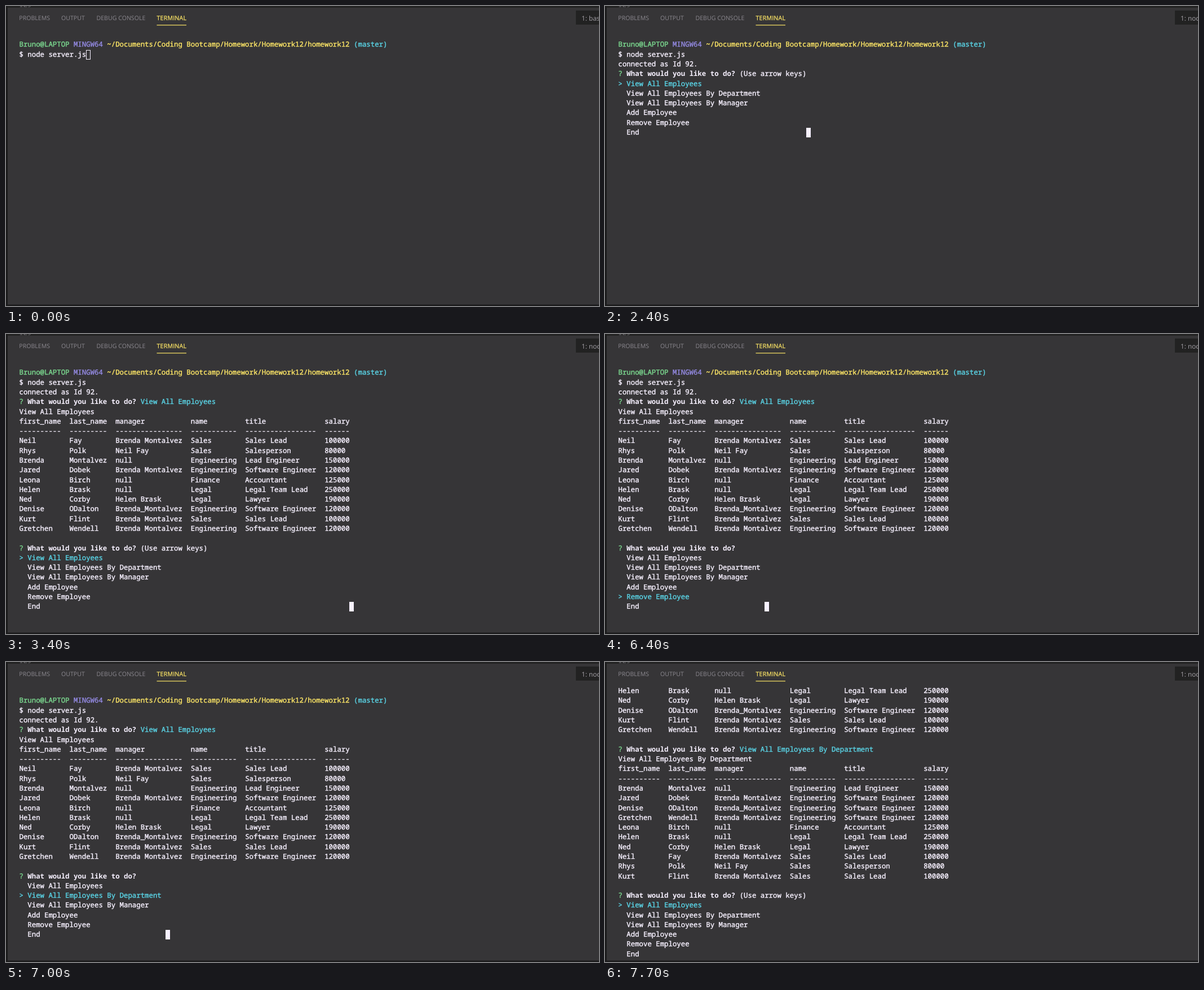
Animation of 1052 by 532 pixels, one loop 8000 ms. Source, as an HTML page:

```html
<!DOCTYPE html>
<html lang="en">
<head>
<meta charset="utf-8">
<title>Employee tracker terminal</title>
<style>
  html, body { margin: 0; width: 100%; height: 100%; overflow: hidden; background: #363537; }
  svg { display: block; width: 1052px; height: 532px; }
  text { white-space: pre; text-rendering: geometricPrecision; }
  #screen, #edge { font-family: "Noto Sans Mono", "DejaVu Sans Mono", monospace; font-size: 12.37px; }
  #screen { stroke-width: .4px; }
  .ui { font-family: "Open Sans", "Noto Sans", sans-serif; font-size: 10.6px; fill: #8b888f; }
  .ui .active { fill: #fce566; stroke: #fce566; stroke-width: .25px; letter-spacing: .2px; }
  #shell { font-size: 11.8px; fill: #a3a0a6; }
</style>
</head>
<body>
<svg viewBox="0 0 1052 532">
  <rect width="1052" height="532" fill="#363537"/>
  <rect width="1052" height="3" fill="#222222"/>
  <rect width="3" height="532" fill="#1b1b1c"/>
  <rect y="529.5" width="1052" height="2.5" fill="#1b1b1c"/>
  <text id="edge" x="23" y="2" fill="#69676c">129</text>
  <g class="ui">
    <text x="23.3" y="24.5">PROBLEMS</text>
    <text x="98" y="24.5">OUTPUT</text>
    <text x="160.5" y="24.5">DEBUG CONSOLE</text>
    <text x="267.5" y="24.5" class="active">TERMINAL</text>
  </g>
  <rect x="267.5" y="33.3" width="52.5" height="1.2" fill="#fce566"/>
  <rect x="1011" y="8" width="41" height="25" fill="#222222"/>
  <text id="shell" class="ui" x="1021" y="25.5">1: bash</text>
  <g id="screen"></g>
  <rect id="caret"/>
  <path id="pointer" d="M-3 -8.5h6M0 -8.5v17M-3 8.5h6" fill="none" stroke="#f7f1ff"/>
</svg>
<script>
const LOOP = 8000, CHAR = 7.42, ROW = 17.28, LEFT = 23.5, BASE = 55.2;
const WHITE = '#f7f1ff', GREEN = '#7bd88f', CYAN = '#5ad4e6', YELLOW = '#fce566', PURPLE = '#948ae3';
const $ = id => document.getElementById(id);

const OPTIONS = ['View All Employees', 'View All Employees By Department',
  'View All Employees By Manager', 'Add Employee', 'Remove Employee', 'End'];
const HEAD = ['first_name', 'last_name', 'manager', 'name', 'title', 'salary'];
const WIDTHS = [10, 9, 16, 11, 17, 6];
const STAFF = `Neil,Fay,Brenda Montalvez,Sales,Sales Lead,100000
Rhys,Polk,Neil Fay,Sales,Salesperson,80000
Brenda,Montalvez,null,Engineering,Lead Engineer,150000
Jared,Dobek,Brenda Montalvez,Engineering,Software Engineer,120000
Leona,Birch,null,Finance,Accountant,125000
Helen,Brask,null,Legal,Legal Team Lead,250000
Ned,Corby,Helen Brask,Legal,Lawyer,190000
Denise,ODalton,Brenda_Montalvez,Engineering,Software Engineer,120000
Kurt,Flint,Brenda Montalvez,Sales,Sales Lead,100000
Gretchen,Wendell,Brenda Montalvez,Engineering,Software Engineer,120000`
  .split('\n').map(row => row.split(','));

// A line is a list of runs: [text, colour, bold].
const plain = text => [[text, WHITE]];
const tableRow = cells => plain(cells.map((c, i) => c.padEnd(WIDTHS[i])).join('  '));
const table = rows => [HEAD, WIDTHS.map(w => '-'.repeat(w)), ...rows].map(tableRow);
const ask = (tail = '', colour = WHITE) =>
  [['? ', GREEN], ['What would you like to do? ', WHITE, true], [tail, colour]];
const menu = (pick, hint) => [ask(hint ? '(Use arrow keys)' : ''),
  ...OPTIONS.map((o, i) => i === pick ? [['> ' + o, CYAN]] : plain('  ' + o))];
const answer = (i, rows) => [ask(OPTIONS[i], CYAN), plain(OPTIONS[i]), ...table(rows)];

const byDept = [...STAFF].sort((a, b) => a[3] < b[3] ? -1 : a[3] > b[3] ? 1 : 0);
const start = [[],
  [['Bruno@LAPTOP ', GREEN], ['MINGW64 ', PURPLE],
   ['~/Documents/Coding Bootcamp/Homework/Homework12/homework12 ', YELLOW], ['(master)', CYAN]],
  plain('$ node server.js')];
const ready = [...start, plain('connected as Id 92.')];
const all = [...ready, ...answer(0, STAFF), []];
const dept = [...all, ...answer(1, byDept)];
const picking = i => ({ lines: [...all, ...menu(i)], caret: [35, 25] });

const SCENES = [
  { at: 0, lines: start, caret: [16, 2], hollow: true },
  { at: 900, lines: start, caret: [16, 2] },
  { at: 1900, lines: start, caret: [0, 3] },
  { at: 2400, lines: [...ready, ...menu(0, true)], caret: [45, 10] },
  { at: 3400, lines: [...all, ...menu(0, true)], caret: [79, 25] },
  { at: 5800, ...picking(5) },
  { at: 6200, lines: all },
  { at: 6400, ...picking(4) },
  { at: 6500, ...picking(3) },
  { at: 6700, ...picking(2) },
  { at: 7000, ...picking(1) },
  { at: 7600, lines: dept, caret: [0, 33], scroll: 6 },
  { at: 7700, lines: [...dept, [], ...menu(0, true)], scroll: 13 }
];

// Each word is placed on the character grid.
function lineMarkup(runs, row) {
  let col = 0, out = '';
  for (const [text, colour, bold] of runs) {
    const weight = bold ? 'font-weight="700"' : `stroke="${colour}"`;
    for (const word of text.matchAll(/\S+/g)) {
      const x = LEFT + (col + word.index) * CHAR;
      out += `<text x="${x.toFixed(2)}" y="${(BASE + row * ROW).toFixed(2)}" ` +
        `fill="${colour}" ${weight}>${word[0].replace('>', '&gt;')}</text>`;
    }
    col += text.length;
  }
  return out;
}

function show({ at, lines, caret, hollow, scroll = 0 }) {
  $('screen').innerHTML = lines.slice(scroll).map(lineMarkup).join('');
  $('shell').textContent = at < 1900 ? '1: bash' : '1: node';
  const box = $('caret');
  box.style.display = caret ? '' : 'none';
  if (!caret) return;
  const inset = hollow ? 0.5 : 0;
  box.setAttribute('x', Math.round(LEFT + caret[0] * CHAR - 0.3) + inset);
  box.setAttribute('y', Math.round(BASE + (caret[1] - scroll) * ROW - 12) + inset);
  box.setAttribute('width', 8 - 2 * inset);
  box.setAttribute('height', 17 - 2 * inset);
  box.setAttribute('fill', hollow ? 'none' : WHITE);
  box.setAttribute('stroke', hollow ? WHITE : 'none');
}

function movePointer(t) {
  const tick = Math.floor(t / 100);
  const p = Math.min(1, Math.max(0, (tick - 2) / 5));
  const lift = Math.min(2, Math.max(0, tick - 8)) / 2;
  $('pointer').style.display = t >= 200 && t < 2400 ? '' : 'none';
  $('pointer').setAttribute('transform', `translate(${28 + 391.5 * p} ${9 + 116 * p - 47 * lift})`);
}

let current;
function draw() {
  const t = performance.now() % LOOP;
  const scene = SCENES.findLast(s => s.at <= t);
  if (scene !== current) show(current = scene);
  movePointer(t);
  requestAnimationFrame(draw);
}
draw();
</script>
</body>
</html>
```
